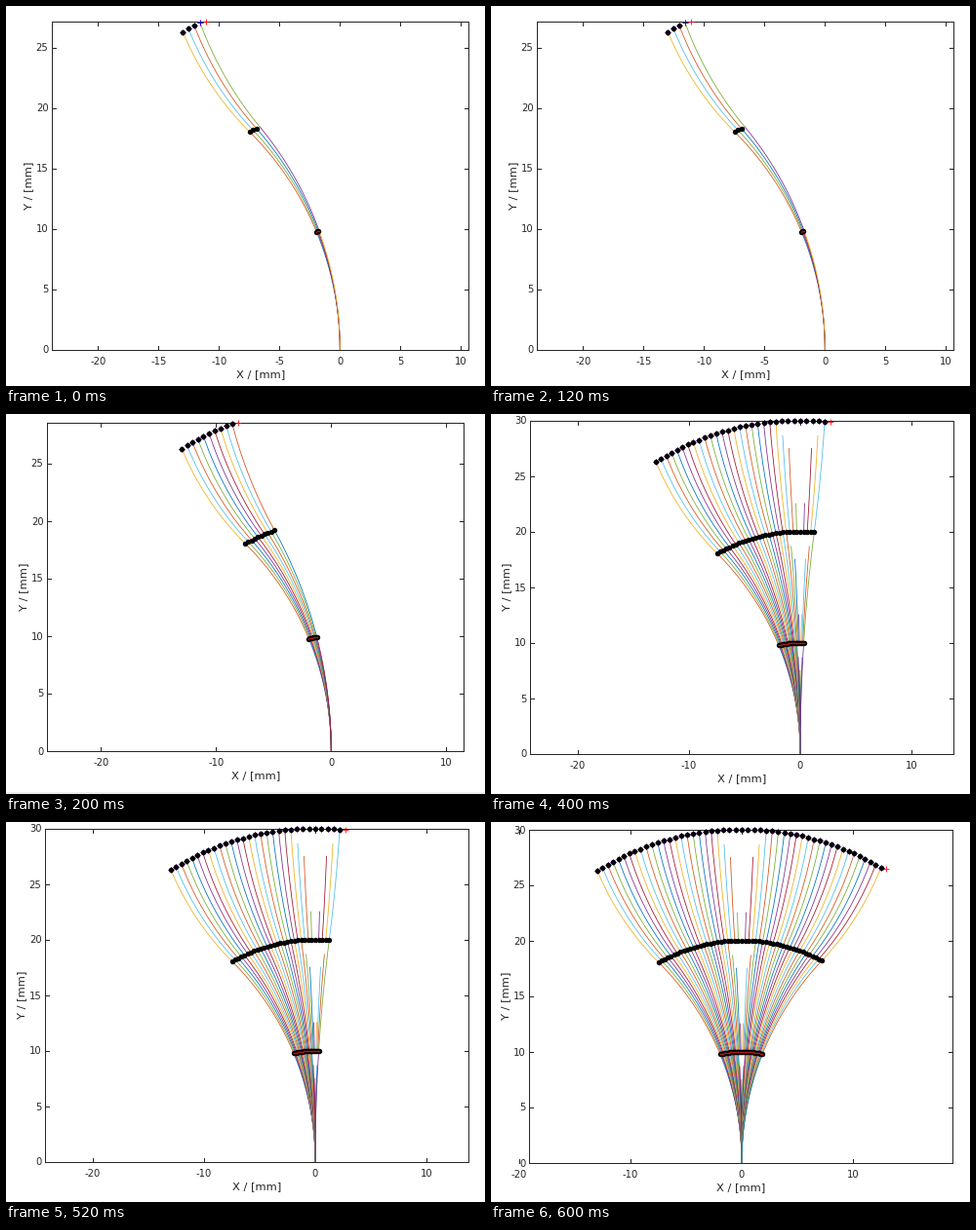
Recreate the animation shown at these times as a matplotlib script. Size 491 by 390 pixels, loop 0.8 s.

```python
import numpy as np
import matplotlib.pyplot as plt
from matplotlib.animation import FuncAnimation

W, H, DPI = 491, 390, 100
PX = 72 / DPI  # points per pixel
INK = "#262626"
PALETTE = ["#0072BD", "#D95319", "#EDB120", "#7E2F8E", "#77AC30", "#4DBEEE", "#A2142F"]

POSES = 51
SECTION = 10.0
ANGLES = np.linspace(-np.pi / 8, np.pi / 8, POSES)
BENDS = (1, 1, -1)
# Nearly straight arcs stop short of their end.
REACH = {0: 0.0, 1: 0.25, 2: 0.75, 3: 0.86}

# curves, dots, axes left/top/right/bottom, x origin, px per mm, x step, footer rule
VIEWS = [
    dict(curves=4, dots=3, box=(47.5, 15.5, 474.5, 352.5), x0=342.3, scale=12.4, step=5, footer=False),
    dict(curves=10, dots=10, box=(42.5, 8.5, 469.5, 345.5), x0=333.3, scale=11.8, step=10, footer=True),
    dict(curves=30, dots=30, box=(40.5, 6.5, 474.5, 348.5), x0=317, scale=11.4, step=10, footer=False),
    dict(curves=50, dots=50, box=(39.5, 7.5, 473.5, 349.5), x0=257, scale=11.4, step=10, footer=False),
]

plt.rcParams["font.family"] = "DejaVu Sans"
fig = plt.figure(figsize=(W / DPI, H / DPI), dpi=DPI, facecolor="white")
ax = fig.add_axes([0, 0, 1, 1])


def sections(angle):
    """Three constant-curvature arcs, each as an array of (x, y) in mm."""
    s = np.linspace(0, SECTION, 61)
    start, heading = np.zeros(2), 0.0
    arcs = []
    for bend in BENDS:
        turn = bend * angle
        half = turn * s / SECTION / 2
        chord = s * np.sinc(half / np.pi)
        arc = start + np.column_stack([chord * np.sin(heading + half),
                                       chord * np.cos(heading + half)])
        arcs.append(arc)
        start, heading = arc[-1], heading + turn
    return arcs


ARMS = [sections(a) for a in ANGLES]
JOINTS = np.array([[arc[-1] for arc in arm] for arm in ARMS])


def label(x, y, text, size, **kw):
    ax.text(x, y, text, fontsize=size * PX, color=INK, **kw)


def line(xs, ys, color=INK, width=1.0, **kw):
    ax.plot(xs, ys, color=color, lw=width * PX, **kw)


def draw_axes(view):
    left, top, right, bottom = view["box"]
    x0, scale, step = view["x0"], view["scale"], view["step"]
    line([left, right, right, left, left], [top, top, bottom, bottom, top], snap=True)
    for value in range(-20, 11, step):
        x = x0 + value * scale
        line([x, x], [bottom, bottom - 4], snap=True)
        line([x, x], [top, top + 4], snap=True)
        label(x, bottom + 15.5, str(value), 10, ha="center", va="baseline")
    for value in range(0, 31, 5):
        y = bottom - value * scale
        if y < top - 1:
            continue
        line([left, left + 4], [y, y], snap=True)
        line([right, right - 4], [y, y], snap=True)
        label(left - 4, y + 4, str(value), 10, ha="right", va="baseline")
    label((left + right) / 2, bottom + 28.5, "X / [mm]", 11.5, ha="center", va="baseline")
    label(left - 21.5, (top + bottom) / 2, "Y / [mm]", 11.5, rotation=90,
          rotation_mode="anchor", ha="center", va="baseline")


def draw(frame):
    ax.clear()
    ax.set(xlim=(0, W), ylim=(H, 0))
    ax.axis("off")
    view = VIEWS[frame]
    curves, dots = view["curves"], view["dots"]

    def to_px(points):
        points = np.atleast_2d(points)
        return (view["x0"] + points[:, 0] * view["scale"],
                view["box"][3] - points[:, 1] * view["scale"])

    def marks(points, shape, color, size, edge=0.0):
        ax.plot(*to_px(points), shape, color=color, ms=size * PX, mew=edge * PX, zorder=3)

    if view["footer"]:
        line([0, W], [388.5, 388.5], "#E8E8E8", 1.5)
    draw_axes(view)

    for i, arm in enumerate(ARMS[:curves]):
        reach = REACH.get(abs(i - POSES // 2), 1.0)
        for k, arc in enumerate(arm):
            count = round(reach * 60) + 1
            line(*to_px(arc[:count]), PALETTE[(3 * i + k) % 7], 0.8)

    tips = JOINTS[:, 2]
    last, following = tips[curves - 1], tips[curves]
    goal = [following[0], last[1] + 0.35 * (following[1] - last[1])]
    marks(tips[:curves], "+", "red", 6, 0.8)
    marks(goal, "+", "red", 6, 0.8)
    marks(tips[:curves], "+", "blue", 6, 0.8)
    for k in range(3):
        marks(JOINTS[:dots, k], "o", "black", 5.4)
    marks(JOINTS[:curves, 0], "o", "#B01818", 1.6)
    return []


anim = FuncAnimation(fig, draw, frames=len(VIEWS), interval=200, init_func=lambda: [],
                     repeat=True, repeat_delay=0, blit=False)
plt.show()
```
